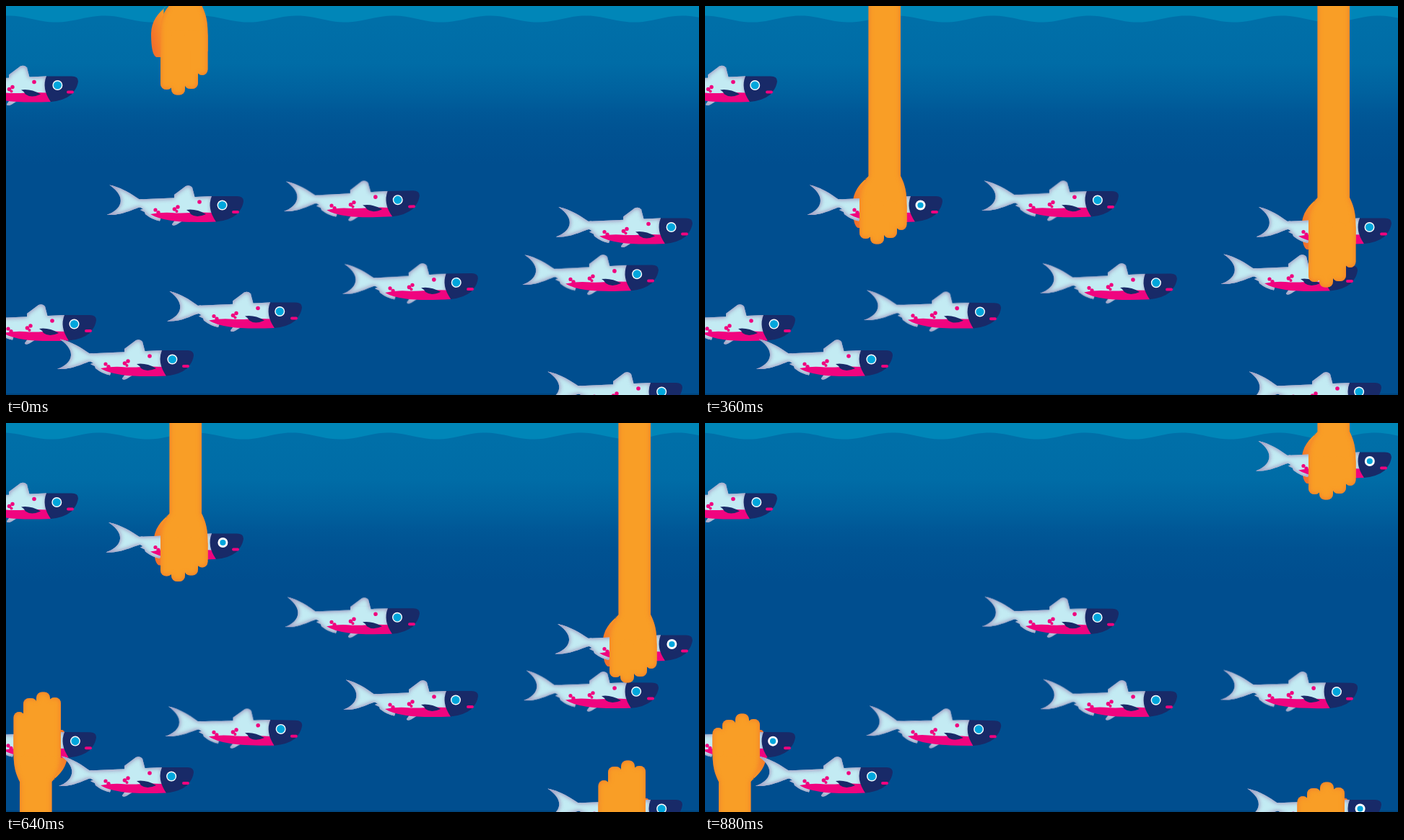
An HTML page that plays this animation: 960x540 px, repeating every 920 ms.

```html
<!DOCTYPE html>
<html lang="en">
<head>
<meta charset="utf-8">
<title>Fishing hands</title>
<style>
  html, body { margin: 0; width: 100%; height: 100%; overflow: hidden; background: #004e8f; }
  svg { display: block; width: 960px; height: 540px; }
</style>
</head>
<body>
<svg id="stage" viewBox="0 0 960 540" xmlns="http://www.w3.org/2000/svg">
  <defs>
    <linearGradient id="water" x2="0" y2="220" gradientUnits="userSpaceOnUse">
      <stop offset=".1" stop-color="#006fa8"/>
      <stop offset=".36" stop-color="#006ca6"/>
      <stop offset=".55" stop-color="#00619e"/>
      <stop offset=".67" stop-color="#005897"/>
      <stop offset=".8" stop-color="#005292"/>
      <stop offset="1" stop-color="#004e8f"/>
    </linearGradient>
    <linearGradient id="thumbFill" x1="1" x2="0" y1="0" y2=".6">
      <stop offset=".2" stop-color="#f99e26"/>
      <stop offset="1" stop-color="#f26f2b"/>
    </linearGradient>
    <filter id="fishShade" color-interpolation-filters="sRGB" x="-10%" y="-20%" width="120%" height="140%">
      <feFlood flood-color="#a49fc4"/>
      <feComposite in2="SourceAlpha" operator="out"/>
      <feGaussianBlur stdDeviation="3"/>
      <feComposite in2="SourceAlpha" operator="in" result="edge"/>
      <feMerge>
        <feMergeNode in="SourceGraphic"/><feMergeNode in="edge"/><feMergeNode in="edge"/>
      </feMerge>
    </filter>
    <filter id="handShade" color-interpolation-filters="sRGB" x="-20%" y="-10%" width="140%" height="120%">
      <feFlood flood-color="#f2762b"/>
      <feComposite in2="SourceAlpha" operator="out"/>
      <feGaussianBlur stdDeviation="3.5"/>
      <feComposite in2="SourceAlpha" operator="in" result="edge"/>
      <feMerge><feMergeNode in="SourceGraphic"/><feMergeNode in="edge"/></feMerge>
    </filter>
    <path id="tail" d="M-185-27.5C-168-24-155-15-144-7.5L-140-8V3C-152 4-164 15-188.5 14C-169 7-160-10-185-27.5z"/>
    <g id="trunk">
      <path d="M-146-7.5L-44-12V23H-80L-112 18L-130 11L-144 3z"/>
      <path d="M-96-9V-14L-92-17L-80-26Q-74-28-71-24L-67-9z"/>
      <path d="M-143 7L-138 5L-128 9L-114 17L-116 22.5Q-126 21-136 13L-137 10z"/>
      <path d="M-94 20L-99 27Q-98 30-92 27L-84 22z"/>
    </g>
    <g id="markings">
      <g fill="#f0047f">
        <path d="M-129 13Q-112 10-100 11T-72 11T-44 11L-38 23.5Q-80 25-100 22Q-120 19-129 13z"/>
        <circle cx="-122" cy="7" r="2.6"/><circle cx="-118" cy="10.5" r="2.6"/>
        <circle cx="-95.5" cy="6" r="2.8"/><circle cx="-92.5" cy="9" r="2"/>
        <circle cx="-91" cy="3" r="2.7"/><circle cx="-61" cy="-4" r="2.8"/>
      </g>
      <g fill="#182a68">
        <path d="M-79 7Q-66 5-52 13Q-65 19-73 13Q-75 9-79 7z"/>
        <path d="M-44-12H-9Q0-12 0-5Q-1 3-6 9L-9 13Q-20 22-38 23.5Q-51 5-44-12z"/>
      </g>
      <rect x="-16" y="8" width="10" height="4" rx="2" fill="#f0047f"/>
    </g>
  </defs>
  <rect width="960" height="540" fill="#0086b8"/>
  <path id="sea" fill="url(#water)"/>
  <rect y="538" width="960" height="2" fill="#00467f"/>
  <g id="thumbs"></g>
  <g id="shoal"></g>
  <g id="palms"></g>
</svg>
<script>
const LOOP = 920, STEP = 40;
const $ = id => document.getElementById(id);
const clamp = v => Math.max(0, Math.min(1, v));

function add(parent, tag, attrs = {}) {
  const el = document.createElementNS('http://www.w3.org/2000/svg', tag);
  for (const k in attrs) el.setAttribute(k, attrs[k]);
  return parent.appendChild(el);
}

// Each hand: place, landing time, braking, grip time, lift time
const hands = [
  { x: 0, y: 0, land: 120, brake: .01646, grip: 260, lift: 605.2 },
  { x: 622, y: 30, land: 323, brake: .00578, grip: 460, lift: 800 },
  { x: 1100, y: 829, up: true, land: 480, brake: .01646, grip: 660 },
  { x: 290, y: 734, up: true, land: 640, brake: .01646, grip: 800 }
];

// x, width, tip, and how far the tip curls up
const fingers = [[214, 17, 353, 30], [229, 19, 360.5, 30], [247, 19, 352, 30], [264, 15.5, 333, 22]];

// Nose x, eye y, time the tail is shortest, first tilt, turn over one loop, holding hand
const shoal = [
  [100, 109.5, 430, 0, 0], [329, 276, 240, 0, 0, 0], [573, 269.3, 640, -.9, 1.3],
  [951, 306.5, 240, 0, 0, 1], [904, 372, 600, -.5, 1.3], [654, 384, 640, -.9, 1.3],
  [410, 423.5, 80, 0, 1.8], [125, 441, 120, 0, .2, 3], [260, 490, 580, 0, 0], [937, 535, 320, 0, 0, 2]
].map(([x, y, phase, tilt, turn, hand]) => ({ x, y, phase, tilt, turn, hand: hands[hand] }));

for (const h of hands) {
  h.thumb = add($('thumbs'), 'path', {
    fill: 'url(#thumbFill)',
    d: 'M228 236C214 246 205 258 204.5 275C204.5 290 206 306 212 308H222V240z'
  });
  h.palm = add($('palms'), 'g', { fill: '#f99e26', filter: 'url(#handShade)' });
  add(h.palm, 'path', {
    d: 'M226.5-150H271V236C276 246 279.5 256 279.5 275V300H214V272C214 256 217 247 226.5 236z'
  });
  h.fingers = fingers.map(([x, width]) => add(h.palm, 'rect', { x, y: 270, width, rx: 8 }));
}

for (const f of shoal) {
  f.el = add($('shoal'), 'g');
  const pale = add(f.el, 'g', { fill: '#c3ebf3', filter: 'url(#fishShade)' });
  f.tail = add(pale, 'use', { href: '#tail' });
  add(pale, 'use', { href: '#trunk' });
  add(f.el, 'use', { href: '#markings' });
  f.eye = add(f.el, 'g');
  add(f.eye, 'circle', { r: 7, fill: '#fff' });
  f.iris = add(f.eye, 'circle', { fill: '#00a6dc' });
}

function drawSea(t) {
  let d = 'M0 540';
  for (let x = 0; x <= 960; x += 6) {
    const y = 18 - 4.6 * Math.cos((x - 136 + t * .0105) / 133.5 * 2 * Math.PI);
    d += `L${x} ${y.toFixed(2)}`;
  }
  $('sea').setAttribute('d', d + 'V540z');
}

function drawHand(h, t) {
  h.closed = clamp((t - h.grip) / 80);
  h.rise = h.lift ? Math.max(0, t - h.lift) * 127 / STEP : 0;
  const reach = h.brake * Math.max(0, h.land - t) ** 2 + h.rise;
  const place = h.up
    ? `translate(${h.x} ${h.y + reach}) scale(-1)`
    : `translate(${h.x} ${h.y - reach})`;
  h.palm.setAttribute('transform', place);
  h.thumb.setAttribute('transform', `${place} translate(${t < h.land ? -3.5 : 0} 0)`);
  h.fingers.forEach((el, i) => {
    const [, , tip, curl] = fingers[i];
    el.setAttribute('height', tip - curl * h.closed - 270);
  });
}

function drawFish(f, t) {
  const sway = Math.cos((t - f.phase) / 800 * 2 * Math.PI);
  const rise = f.hand ? f.hand.rise : 0;
  const closed = f.hand ? f.hand.closed : 0;
  const angle = f.tilt + f.turn * t / LOOP;
  f.el.setAttribute('transform', `translate(${f.x} ${f.y - rise}) rotate(${angle} -70 5)`);
  f.tail.setAttribute('transform', `translate(-143 0) scale(${1 - sway * 2 / 45} 1) translate(143 0)`);
  f.eye.setAttribute('transform', `translate(${-29.8 - 1.2 * sway} .5)`);
  f.iris.setAttribute('r', 5.6 - 1.5 * closed);
}

const start = performance.now();
let last = -1;
function tick() {
  const time = Math.max(0, performance.now() - start) % LOOP;
  const t = Math.floor(time / STEP) * STEP;
  if (t !== last) {
    last = t;
    drawSea(t);
    hands.forEach(h => drawHand(h, t));
    shoal.forEach(f => drawFish(f, t));
  }
  requestAnimationFrame(tick);
}
tick();
</script>
</body>
</html>
```
